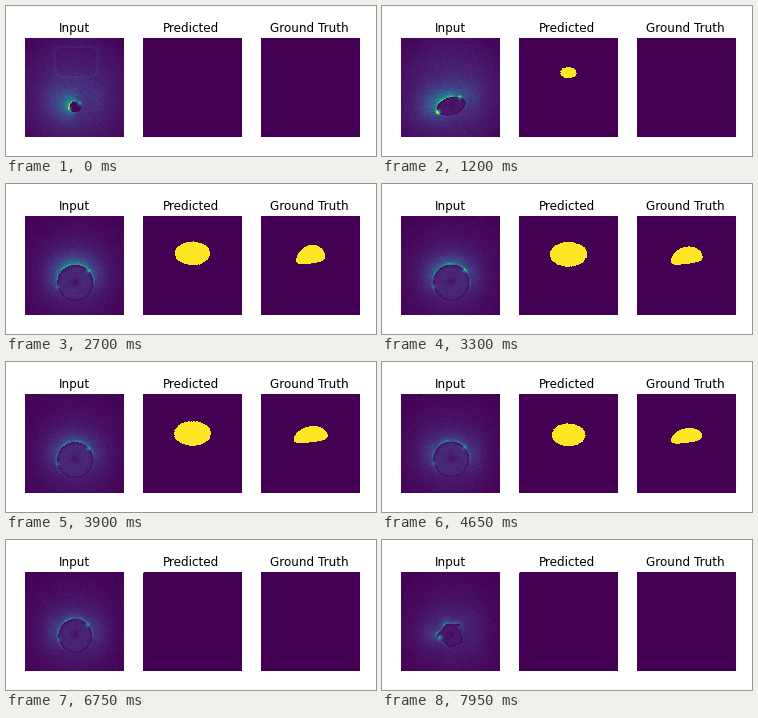
These frames come from a looping animation (370x150 px, 8100 ms). A matplotlib script:

```python
import numpy as np
import matplotlib.pyplot as plt
from matplotlib.animation import FuncAnimation

W, H, DPI = 370, 150, 100
FRAMES, INTERVAL = 54, 150
SIDE, TOP = 99, 32          # panel size and upper edge in pixels
# left edge, title centre, title
PANELS = [(19, 68.5, "Input"), (137, 185.5, "Predicted"), (255, 303.5, "Ground Truth")]

Y, X = np.mgrid[0:SIDE, 0:SIDE] + 0.5


def smooth(i, start, end):
    t = np.clip((i - start) / (end - start), 0, 1)
    return t * t * (3 - 2 * t)


def bump(x, centre, width):
    return np.exp(-((x - centre) / width) ** 2)


def bladder():
    """Faint rounded trapezoid seen in the first slices."""
    half = 21 - 0.1 * (Y - 25)
    d = (np.abs((X - 51) / half) ** 6 + np.abs((Y - 24) / 15) ** 6) ** (1 / 6)
    return 0.04 * bump(d, 1, 0.06) - 0.01 * (d < 1)


def scan(i):
    rng = np.random.default_rng(100 + i)
    opening = smooth(i, 0, 16) * (1 - 0.5 * smooth(i, 42, 53))
    squash = bump(i, 8, 4)
    ragged = smooth(i, 44, 53)
    early = 1 - smooth(i, 10, 32)

    # soft tissue, darker towards the corners, with a pale lobe on either side
    body = np.clip(1.25 - np.hypot((X - 49.5) / 58, (Y - 55) / 62), 0.1, 1)
    v = (0.045 + 0.06 * (1 - smooth(i, 8, 17))) * body
    lobe = bump(np.abs(X - 50), 23, 9) * bump(Y, 60, 17)
    v += (0.03 + 0.08 * bump(i, 38, 6)) * lobe
    v += bladder() * (1 - smooth(i, 0, 6))

    # distance to the wall of the cavity
    cx, cy = 50.3, 69 - 6 * i / (FRAMES - 1)
    r = 5.5 + 12.5 * opening
    rx, ry = r * (1 + 0.25 * squash), r * (1 - 0.25 * squash)
    tilt = np.radians(-17 * squash)
    c, s = np.cos(tilt), np.sin(tilt)
    dx, dy = X - cx, Y - cy
    ang = np.arctan2(dy, dx)
    d = np.hypot((dx * c + dy * s) / rx, (dy * c - dx * s) / ry)
    d *= 1 + ragged * (0.1 * np.cos(5 * ang + 0.6) + 0.08 * np.cos(3 * ang))
    gap = (d - 1) * r
    out = np.clip(gap, 0, None)

    # glow and bright rim, strongest on the upper side
    heading = np.radians(-100 - 60 * (1 - opening))
    facing = 0.5 + 0.5 * np.cos(ang - heading)
    v += (0.18 + 0.32 * early) * facing ** 2 * np.exp(-out / (6 + 2 * early))
    v += 0.04 * np.exp(-out / 16)
    patchy = 0.6 + 0.4 * np.sin(7 * ang + 0.9 * i)
    v += 0.22 * facing * patchy * bump(gap, 1, 1)

    hole = 0.02 + 0.09 * opening
    hole = hole * (1 - 0.6 * bump(np.hypot(dx, dy + 1), 0, 4))
    v = np.where(gap < 0, hole * (1 - 0.7 * bump(gap, 0, 1.8)), v)

    # two hot spots that ride on the wall
    for deg, power in ((167, 0.2 + 0.6 * squash + 0.4 * ragged),
                       (-42, 0.4 * (1 - 0.6 * ragged))):
        a = np.radians(deg)
        px, py = rx * np.cos(a), ry * np.sin(a)
        dist = np.hypot(dx - px * c + py * s, dy - px * s - py * c)
        v += power * bump(dist, 0, 2)

    v *= 1 + 0.12 * rng.standard_normal(v.shape)
    v += 0.007 * rng.standard_normal(v.shape)
    return np.clip(v, 0, 1)


def predicted(i):
    """Slices through an ellipsoid, then one stray pixel."""
    mask = np.zeros((SIDE, SIDE))
    if i > 41:
        mask[0, 0] = 1
    elif i >= 7:
        size = np.sqrt(1 - ((i - 23.7) / 17.5) ** 2)
        rng = np.random.default_rng(300 + i)
        d = np.hypot((X - 49.5) / (18.6 * size), (Y - 32.5 - 0.27 * i) / (12.4 * size))
        mask[d + rng.normal(0, 0.015 / size, d.shape) < 1] = 1
    return mask


def truth(i):
    """Dome with a nearly flat, slightly slanted lower edge."""
    if not 11 <= i <= 41:
        return np.zeros((SIDE, SIDE))
    size = 0.5 + 0.5 * smooth(i, 11, 17)
    u = (X - 49.7) / (size * (14 + 3 * bump(i, 26, 6)))
    top, bottom = 29 + 0.4 * (i - 18), 47.5 + 0.1 * (i - 18)
    waist = bottom - 5 - 2 * u
    rise = np.clip(waist - Y, 0, None) / (size * (bottom - 5 - top))
    drop = np.clip(Y - waist, 0, None) / (size * 5)
    return ((np.abs(u) ** 2 + rise ** 1.8 < 1) & (np.abs(u) ** 3 + drop ** 3 < 1)).astype(float)


plt.rcParams["font.family"] = "DejaVu Sans"
fig = plt.figure(figsize=(W / DPI, H / DPI), dpi=DPI, facecolor="white")
images = []
for left, centre, title in PANELS:
    images.append(fig.figimage(np.zeros((SIDE, SIDE)), xo=left, yo=H - TOP - SIDE,
                               cmap="viridis", vmin=0, vmax=1, origin="upper"))
    fig.text(centre / W, 1 - (TOP - 6) / H, title, ha="center", va="baseline",
             fontsize=12 * 72 / DPI, color="black")


def draw(i):
    for image, make in zip(images, (scan, predicted, truth)):
        image.set_data(make(i))
    return images


anim = FuncAnimation(fig, draw, frames=FRAMES, init_func=lambda: draw(0),
                     interval=INTERVAL, repeat=True, blit=False)
plt.show()
```
